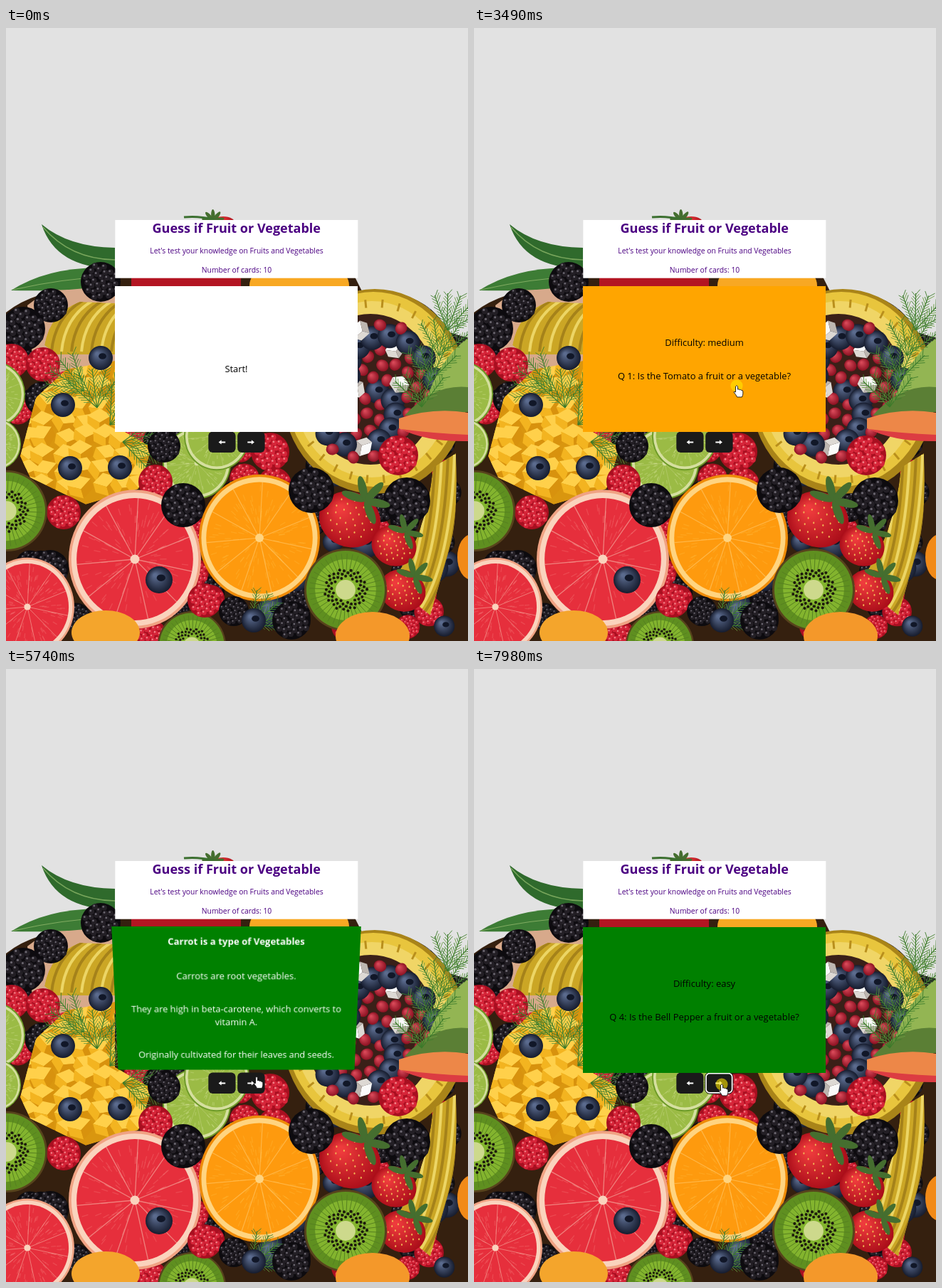
An HTML page with a canvas that plays this animation: 649x862 px, repeating every 8000 ms.

```html
<!DOCTYPE html>
<html lang="en">
<head>
<meta charset="utf-8">
<title>Fruit or Vegetable</title>
<style>
html, body { margin: 0; width: 100%; height: 100%; overflow: hidden; background: #e2e2e2; }
#stage { position: absolute; left: 0; top: 0; width: 649px; height: 862px; overflow: hidden; }
#stage > * { position: absolute; left: 0; top: 0; display: block; }
#stage > #card { left: 153.3px; top: 362.8px; width: 341px; height: 205px; }
#card svg { display: block; }
text { font-family: "Open Sans", "Noto Sans", sans-serif; text-anchor: middle; }
</style>
</head>
<body>
<div id="stage">
  <canvas id="photo" width="649" height="862"></canvas>
  <svg width="649" height="862">
    <rect x="153.3" y="270" width="341" height="81.7" fill="#fff"/>
    <g fill="#4b0082" font-size="10.35">
      <text x="323.8" y="287.8" font-size="18.04" font-weight="700">Guess if Fruit or Vegetable</text>
      <text x="324" y="316.6">Let's test your knowledge on Fruits and Vegetables</text>
      <text x="324" y="343.8">Number of cards: 10</text>
    </g>
    <g fill="#1a1a1a">
      <rect x="284.3" y="567.6" width="38.2" height="29.4" rx="6"/>
      <rect x="325.2" y="567.6" width="38.4" height="29.4" rx="6"/>
    </g>
    <path fill="#fff" d="M298.6 582.4l4-3.1v2.1h5.6v2h-5.6v2.1zM348.9 582.4l-4-3.1v2.1h-5.6v2h5.6v2.1z"/>
    <g id="ring" fill="none">
      <rect x="324.6" y="567.3" width="39.4" height="30" rx="6.5" stroke="#101010"/>
      <rect x="326" y="568.7" width="36.6" height="27.2" rx="5" stroke="#fff" stroke-width="1.7"/>
    </g>
  </svg>
  <div id="card"><svg id="face" width="341" height="205" viewBox="153.3 362.8 341 205"></svg></div>
  <svg width="649" height="862">
    <g id="cursor">
      <circle id="glow" r="8.6" fill="#ffe600" fill-opacity=".6"/>
      <path id="hand" fill="#fff" stroke="#111" stroke-width=".9" stroke-linejoin="round"
        d="M-1.5 1Q0-1.6 1.5 1V5.2Q3 4 4.2 5.8Q5.8 4.8 6.6 6.6Q8.7 6 8.8 8.2V11.5Q8.6 13.5 7.4 16H.6Q-1 12.6-3.8 9.4Q-4.4 7.3-1.5 9Z"/>
      <path id="arrow" fill="#fff" stroke="#111" stroke-width=".9" d="M0 0V13.5L3.1 10.7L5 15.2L7.2 14.2L5.2 9.9H9.4Z"/>
    </g>
  </svg>
</div>
<script>
const $ = id => document.getElementById(id);
const clamp = u => Math.max(0, Math.min(1, u));
const smooth = u => u * u * (3 - 2 * u);
const easeOut = u => 1 - (1 - u) ** 2;

// ---------- still life ----------
const c = $('photo').getContext('2d');
const TURN = 2 * Math.PI, GOLDEN = 2.4;
let seed = 7;
const rnd = (a = 0, b = 1) => {
  seed = (seed * 16807) % 2147483647;
  return a + (b - a) * seed / 2147483647;
};
const loop = (n, f) => { for (let i = 0; i < n; i++) f(i); };
const fill = (color, d) => { c.fillStyle = color; c.fill(new Path2D(d)); };
const line = (color, w, d) => { c.strokeStyle = color; c.lineWidth = w; c.stroke(new Path2D(d)); };
function oval(color, x, y, rx, ry = rx, rot = 0) {
  c.fillStyle = color;
  c.beginPath();
  c.ellipse(x, y, rx, ry, rot, 0, TURN);
  c.fill();
}
function ball(x, y, rx, ry, rot, inner, outer) {
  const g = c.createRadialGradient(x - rx * .3, y - rx * .35, rx * .1, x, y, Math.max(rx, ry));
  g.addColorStop(0, inner);
  g.addColorStop(1, outer);
  oval(g, x, y, rx, ry, rot);
}
// n points on a sunflower spiral, from the middle outwards
function spiral(n, x, y, rx, ry, f) {
  loop(n, i => {
    const d = Math.sqrt((i + .5) / n), a = i * GOLDEN;
    f(x + rx * d * Math.cos(a), y + ry * d * Math.sin(a), i, d);
  });
}
// n spokes between two relative radii
function spokes(n, x, y, rx, ry, from, to, color, w) {
  loop(n, i => {
    const a = i * TURN / n + .2, u = rx * Math.cos(a), v = ry * Math.sin(a);
    line(color, w, `M${x + u * from} ${y + v * from}L${x + u * to} ${y + v * to}`);
  });
}
function beads(x, y, r, base, bead, shine) {
  oval(base, x, y, r);
  spiral(30, x, y, r * .88, r * .88, (px, py) => {
    oval(bead, px, py, r * .145);
    oval(shine, px - r * .04, py - r * .05, r * .05);
  });
}
const black = (x, y, r = 28) => beads(x, y, r, '#0d0b0f', '#231f25', '#6b6770');
const rasp = (x, y, r = 24) => beads(x, y, r, '#a80f20', '#d62539', '#f0858a');
function blue(x, y, r = 17) {
  ball(x, y, r, r, 0, '#5b6b8e', '#161c2e');
  oval('#111728', x + r * .15, y - r * .15, r * .32, r * .25);
}
function citrus(x, y, r, rind, pith, flesh, grain) {
  const ry = r * 1.05;
  oval(rind, x, y, r, ry);
  oval(pith, x, y, r * .96, ry * .96);
  oval(flesh, x, y, r * .88, ry * .88);
  c.globalAlpha = .3;
  loop(120, () => {
    const a = rnd(0, TURN), d = rnd(.2, .75), u = r * Math.cos(a), v = ry * Math.sin(a);
    line(grain, 1.3, `M${x + u * d} ${y + v * d}l${u * .1} ${v * .1}`);
  });
  c.globalAlpha = .5;
  spokes(11, x, y, r, ry, 0, .88, pith, r * .014);
  c.globalAlpha = 1;
  oval(pith, x, y, r * .07);
}
const grapefruit = (x, y, r) => citrus(x, y, r, '#f0a283', '#fad3bd', '#e62f3c', '#fa8581');
const orange = (x, y, r) => citrus(x, y, r, '#ef8b08', '#ffd480', '#fe9a0e', '#ffc044');
const lime = (x, y, r) => citrus(x, y, r, '#6d9a27', '#d5df9f', '#9bbb45', '#dbe7a0');
function kiwi(x, y, r) {
  oval('#57431c', x, y, r);
  oval('#5f8f20', x, y, r * .95);
  oval('#83b42e', x, y, r * .74);
  spokes(40, x, y, r, r, .35, .88, '#568020', 1);
  spiral(90, x, y, r * .52, r * .52, (px, py, i, d) => d > .55 && oval('#1d1a0d', px, py, r * .035));
  oval('#cdd98c', x, y, r * .24);
}
function leaf(x, y, len, rot) {
  oval('#456e2f', x + len / 2 * Math.cos(rot), y + len / 2 * Math.sin(rot), len / 2, len / 6, rot);
}
const crown = (x, y, len, from, to) => loop(5, i => leaf(x, y, len, from + (to - from) * i / 4));
function strawberry(x, y, r) {
  ball(x, y, r, r * .88, .4, '#ee3b3c', '#a80c18');
  spiral(30, x, y, r * .8, r * .7, (px, py) => oval('#f2b655', px, py, 1, 1.5));
  crown(x + r * .5, y - r * .6, r * .8, -2.8, 1.2);
}
function dill(x, y, len, rot) {
  loop(5, k => {
    const a = rot + (k - 2) * .36, u = len * Math.cos(a), v = len * Math.sin(a);
    line('#3b7a2a', 1.2, `M${x} ${y}l${u} ${v}`);
    loop(18, i => {
      const d = .2 + i * .045, h = len * rnd(.12, .24), b = a + (i % 2 ? .7 : -.7);
      line(i % 3 ? '#3f7d2d' : '#6b9f43', .9, `M${x + u * d} ${y + v * d}l${h * Math.cos(b)} ${h * Math.sin(b)}`);
    });
  });
}
function cube(x, y, s, rot, light, mid, dark) {
  c.save();
  c.translate(x, y);
  c.rotate(rot);
  c.scale(s, s);
  fill(light, 'M-1-.4L0-1L1-.4L0 .2Z');
  fill(mid, 'M-1-.4L0 .2V1L-1 .4Z');
  fill(dark, 'M1-.4L0 .2V1L1 .4Z');
  c.restore();
}
// a flat shape with curved stripes sweeping across it
function slices(d, x, y, dx, dy, step) {
  c.save();
  c.clip(new Path2D(d));
  fill('#cba625', d);
  loop(10, i => line(i % 2 ? '#a5821a' : '#ecd565', 4, `M${x + i * step} ${y}q${dx * .1} ${dy * .7} ${dx} ${dy}`));
  c.restore();
}

function bowl(x, y) {
  oval('#a98419', x, y, 130, 144);
  oval('#e8c53d', x - 2, y - 3, 123, 137);
  oval('#f0d566', x - 4, y - 3, 110, 124);
  spokes(30, x, y, 130, 144, .82, .9, '#b98f1c', 3);
  oval('#3a2018', x - 6, y - 3, 93, 106);
  spiral(70, x - 4, y, 90, 104, (px, py, i) => {
    if (i % 9 === 4) cube(px, py, 13, i, '#fafafa', '#ddd9d4', '#bdb6b0');
    else if (i % 4 === 0) blue(px, py);
    else ball(px, py, 9, 8, i, '#d84858', '#8a0f20');
  });
}
function mango() {
  const d = 'M20 602L42 520L85 480L153 468V560L205 590L186 648L112 670L34 632Z';
  c.save();
  c.clip(new Path2D(d));
  fill('#d9960f', d);
  loop(56, i => cube(28 + i % 7 * 27 + rnd(-5, 5), 485 + (i / 7 | 0) * 23 + rnd(-5, 5), 17, rnd(-.5, .5), '#ffd04a', '#f3b420', '#d8920e'));
  c.restore();
}

function paintPhoto() {
  fill('#e2e2e2', 'M0 0H649V862H0Z');
  const pile = 'M0 400Q40 368 110 366L160 350H490L500 370Q590 365 622 428L649 436V862H0Z';
  fill('#35200f', pile);

  // loose berries fill the gaps
  c.save();
  c.clip(new Path2D(pile));
  loop(130, i => [black, blue, black, rasp][i % 4](rnd(0, 649), rnd(400, 862), rnd(14, 24)));
  c.restore();

  ball(305, 276, 18, 11, 0, '#ee3b3c', '#a80c18');
  crown(291, 271, 16, -3, -.2);
  line('#3c7030', 3, 'M250 266Q270 264 292 269');
  fill('#b31522', 'M176 345H330V368H176Z');
  oval('#f8a823', 412, 362, 70, 40);
  fill('#d7a98b', 'M30 390Q80 350 153 370V470L40 490Z');
  fill('#2f6a2c', 'M50 276Q88 308 153 309V338Q70 338 50 276Z');
  line('#79a65c', 1.5, 'M52 280Q90 325 153 326');
  fill('#3d7c35', 'M7 369Q65 332 153 338V361Q90 371 7 369Z');
  line('#82ac62', 1.2, 'M10 368Q80 352 153 349');
  slices('M54 446Q62 400 104 385L153 387V459H70Z', 50, 455, 50, -75, 14);
  black(133, 357);
  black(63, 390, 24);
  black(24, 423, 31);
  rasp(8, 468);
  rasp(52, 473);

  lime(-17, 515, 44);
  lime(-13, 585, 34);
  mango();
  lime(268, 612, 48);
  lime(296, 574, 46);
  loop(4, i => dill(110 + i * 18, 510 + i * 24, 55, -2.6 + i * .9));
  blue(133, 464);
  blue(80, 530);
  blue(90, 619);
  blue(160, 618);
  rasp(371, 596, 27);
  rasp(377, 642);
  rasp(210, 638);
  rasp(81, 681);
  black(222, 588, 23);

  bowl(518, 511);
  rasp(551, 601, 28);
  fill('#93b553', 'M588 530Q608 465 649 436V530Z');
  fill('#5b7f35', 'M560 545Q600 500 649 505V540Z');
  loop(4, i => dill(620 - i * 12, 425 + i * 36, 52, -1.2 - i * .15));
  fill('#ed8748', 'M552 549Q600 533 649 541V578Q590 580 552 563Z');
  fill('#dc3c42', 'M555 564Q600 570 649 572V581Q590 582 555 564Z');
  slices('M600 618L632 598Q636 690 622 735L596 826L540 780Q590 720 600 618Z', 594, 600, -50, 220, 9);
  oval('#f18a18', 654, 744, 20, 32);
  black(563, 665, 33);

  kiwi(1, 679, 57);
  black(62, 760, 26);
  strawberry(483, 691, 44);
  strawberry(545, 728, 32);
  strawberry(557, 791, 33);
  grapefruit(30, 814, 66);
  grapefruit(181, 747, 93);
  blue(215, 776, 19);
  black(249, 671, 31);
  oval('#f4a52c', 140, 850, 48, 31);
  kiwi(261, 868, 48);
  rasp(279, 805);
  orange(356, 717, 85);
  black(429, 650, 32);
  kiwi(477, 790, 58);
  dill(345, 840, 50, -.7);
  black(320, 820, 21);
  black(401, 833, 27);
  blue(348, 833);
  oval('#f4982a', 515, 855, 52, 34);
}

// ---------- cards ----------
const levels = { easy: '#008000', medium: '#ffa500' };
const quiz = (n, name, level, kind, ...facts) => ({
  color: levels[level], ink: '#fff', frontY: 446.6, backY: 388.3,
  front: ['Difficulty: ' + level, `Q ${n}: Is the ${name} a fruit or a vegetable?`],
  back: [`<tspan font-weight="700">${name} is a type of ${kind}</tspan>`, ...facts]
});
const cards = [
  { color: '#fff', ink: '#000', frontY: 484, backY: 482, front: ['Start!'], back: ["Please press the '-&gt;' arrow to start quiz"] },
  quiz(1, 'Tomato', 'medium', 'Fruits', 'Tomatoes are botanically berries.',
    'They are high in lycopene, which is an\nantioxidant.', 'Originally cultivated in South America.'),
  quiz(2, 'Carrot', 'easy', 'Vegetables', 'Carrots are root vegetables.',
    'They are high in beta-carotene, which converts to\nvitamin A.', 'Originally cultivated for their leaves and seeds.'),
  quiz(3, 'Cucumber', 'medium', 'Fruits', 'Cucumbers grow from flowers.',
    'They are mostly made of water, which keeps them\ncool.', 'Originally cultivated in South Asia.'),
  quiz(4, 'Bell Pepper', 'easy', 'Fruits')
];
const LINE = 19.5, PARAGRAPH = 47.2;

function drawFace(card, side) {
  let y = card[side + 'Y'], out = `<rect x="153.3" y="362.8" width="341" height="205" fill="${card.color}"/>`;
  for (const paragraph of card[side]) {
    paragraph.split('\n').forEach((s, i) => {
      if (i) y += LINE;
      out += `<text x="323.8" y="${y}" font-size="12.95" fill="${side === 'back' ? card.ink : '#000'}">${s}</text>`;
    });
    y += PARAGRAPH;
  }
  $('face').innerHTML = out;
}

// ---------- timeline ----------
const LOOP = 8000, FLIP = 260;
// The pointer alternates between the card and the next button: time it sets off, time it presses, where.
const stop = (leave, down, x, y) => x
  ? { leave, down, up: down + 130, x, y }
  : { leave, down, up: down + 70, x: 348, y: 584, button: true };
const stops = [
  stop(190, 1030, 330, 494), stop(1910, 2640),
  stop(3120, 3490, 369, 503), stop(3660, 4210),
  stop(4980, 5390, 373, 520), stop(5560, 6000),
  stop(6230, 6770, 381, 519), stop(6960, 7340),
  stop(7600, 7950)
];
const entry = { x: 610, y: 872 };

function pointerAt(t) {
  const i = stops.filter(s => s.leave <= t).length - 1;
  if (i < 0) return entry;
  const from = stops[i - 1] || entry, to = stops[i];
  const travel = 220 + 1.2 * Math.hypot(to.x - from.x, to.y - from.y);
  const e = easeOut(clamp((t - to.leave) / travel));
  return { x: from.x + (to.x - from.x) * e, y: from.y + (to.y - from.y) * e };
}
const inside = (p, x0, y0, x1, y1) => p.x > x0 && p.x < x1 && p.y >= y0 && p.y < y1;
const show = (id, on) => $(id).setAttribute('visibility', on ? 'visible' : 'hidden');
let shown = '';

function render(t) {
  // every release flips the card; each second one also brings the next card
  const done = stops.filter(s => s.up <= t), n = done.length;
  const e = n ? smooth(clamp((t - done[n - 1].up) / FLIP)) : 0;
  const angle = 180 * (n % 2 || !n ? e : 1 - e);
  const side = angle > 90 ? 'back' : 'front', key = side + (n >> 1);
  if (key !== shown) drawFace(cards[n >> 1], side);
  shown = key;
  const tilt = side === 'back' ? angle - 180 : angle;
  $('card').style.transform = tilt ? `perspective(716px) rotateX(${tilt}deg)` : 'none';

  const press = stops.filter(s => s.down <= t).pop();
  const p = pointerAt(t);
  const hand = inside(p, 153, 363, 494, 567) || inside(p, 284, 567, 364, 597);
  show('ring', press && press.button);
  show('glow', press && t < press.up);
  show('hand', hand);
  show('arrow', !hand);
  $('cursor').setAttribute('transform', `translate(${p.x} ${p.y})`);
}

paintPhoto();
const t0 = performance.now();
function tick() {
  render((performance.now() - t0) % LOOP);
  requestAnimationFrame(tick);
}
tick();
</script>
</body>
</html>
```
